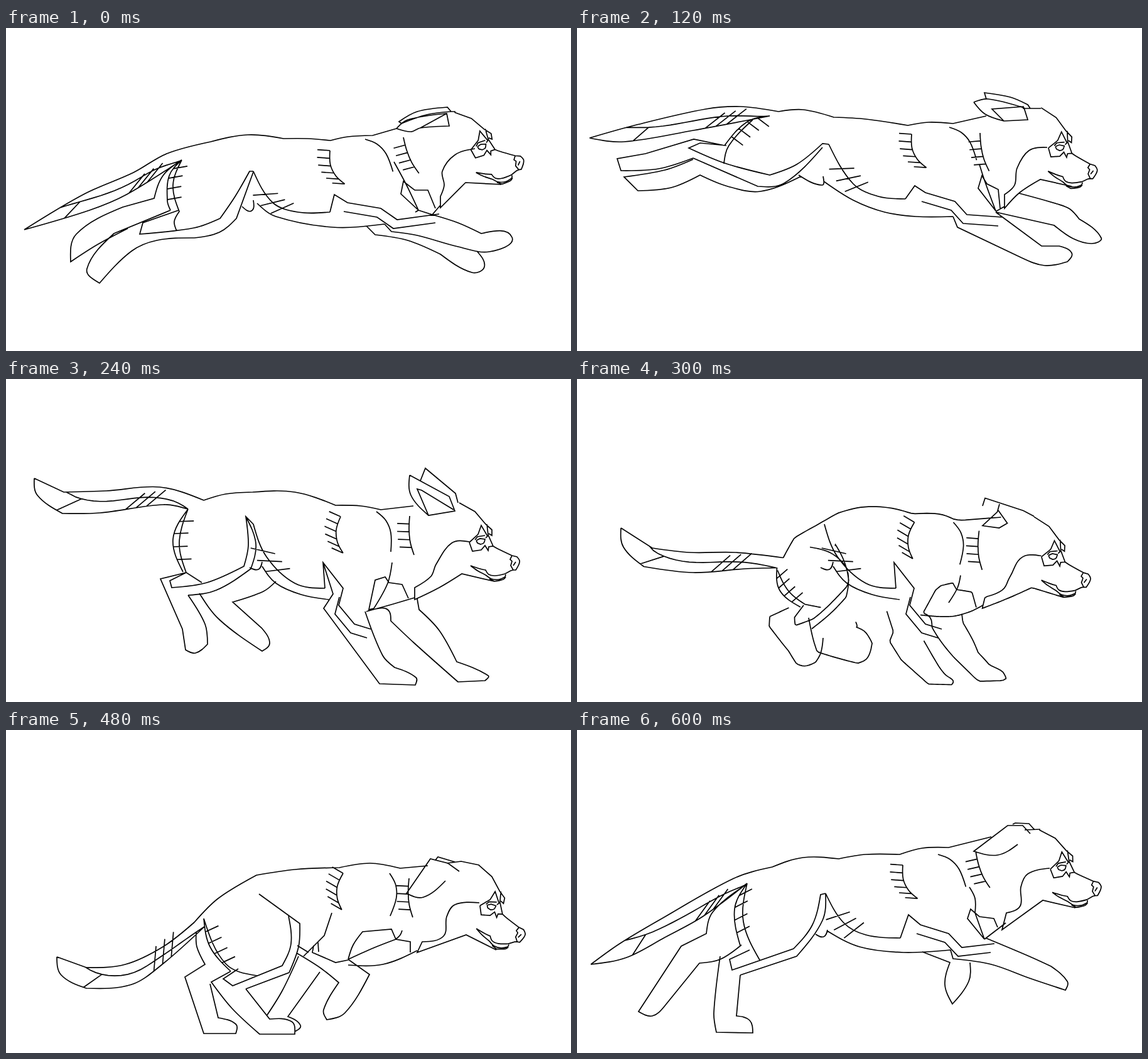
Animation, 900 px wide and 514 px high, one loop 660 ms. Source, as an HTML page:

```html
<!DOCTYPE html>
<html lang="en">
<head>
<meta charset="utf-8">
<title>Running dog</title>
<style>
html, body { margin: 0; width: 100%; height: 100%; overflow: hidden; background: #fff; }
svg { display: block; width: 100%; height: 100%; }
path { fill: none; stroke: #000; stroke-width: 1.7; }
</style>
</head>
<body>
<svg viewBox="0 0 900 514"><path id="dog"/></svg>
<script>
const STEP = 60, STEPS = 11;

// Strokes are split by "/". Points are smooth unless marked "!" as corners.
// Rigid parts are drawn around their anchor and placed as [x, y, degrees].
const RIGID = {
  head: `-33,-61! -8,-47! 9,-27! 19,-18! 19,-9! 14,-12/11,-27! 13,-10! 21,8
/-17,2! -6,-8! -3,-11! 2,-25! 12,-8! 9,-5/-17,2! -12,16! 2,14! 8,7! 13,15! 14,9! 21,8! 28,12 51,23
/-8,-2! -4,-7! 8,-9/-6,-1! 0,-4! 8,-3! 6,3 1,5! -4,3! -6,-1
/51,23! 59,25! 63,31 62,37 57,46! 53,46! 49,39! 51,32! 48,29! 51,23/57,33 53,39
/-15,39! 0,44 9,46! 14,53 24,55 40,52! 49,47! 53,46/-15,39! -4,47 9,54 18,60 30,61 40,57! 41,53
/15,60 23,64! 37,61 41,57`,
  ribs: "0,0 -7,21 -5,41 4,58",
  shoulder: "0,0 15,14 23,34 23,64",
  ruff: "0,0 -1,22 1,42 7,62"
};

// Rows of fur ticks along a stroke; anchor is where a tick sits on the stroke.
const FUR = {
  tail: { stroke: 1, count: 3, from: .64, to: .76, size: 40 },
  rump: { stroke: 0, count: 4, from: .22, to: .8, size: 23 },
  belly: { stroke: 0, count: 3, from: .27, to: .5, size: 40, anchor: .5, fan: -10 },
  ribs: { stroke: 0, count: 6, from: 0, to: 1, size: 20, angle: 204 },
  ruff: { stroke: 0, count: 4, from: .2, to: .8, size: 19, angle: 182 }
};

// Key poses by step; steps without one lie halfway between their neighbours.
const POSES = {
  0: {
    at: { head: [757, 189, -9.5], ribs: [516, 195, -20], shoulder: [572, 177, -21], ruff: [633, 174, -17] },
    fur: { tail: -51, rump: -10, belly: -14 },
    tail: "29,321! 125,264 203,230 256,200 326,181/29,321! 133,290 192,265 280,210",
    back: "326,181! 385,170 442,176! 480,176 517,179! 545,173 584,171! 622,160",
    rump: "280,210! 260,235 257,275 262,290/280,210! 266,250 276,292! 268,308 272,323",
    thigh: "275,290! 218,310! 213,328! 300,318 341,303! 365,268 388,228! 394,228/300,334! 340,325 367,303! 394,229",
    hindRear: "280,210! 250,235 236,271! 186,285! 112,328 103,372! 145,345 194,319",
    hindLead: "262,290! 172,327! 129,383 149,406! 200,355 240,338 300,334",
    groin: "376,284! 391,291 394,274",
    belly: "394,228! 425,278 465,293 516,293/400,279 430,300 520,317 603,312",
    arm: "516,293! 523,265! 544,278! 597,287! 623,305! 690,296",
    lead: "603,312! 614,324! 655,330 720,348 770,356 806,333 757,327! 720,310 679,297",
    trail: "574,315! 588,329! 640,338 692,360! 742,389 762,380 750,355",
    neck: "618,213 638,250 657,290",
    collar: "652,293! 657,290! 629,264! 633,244! 651,258! 672,258! 684,287/657,290! 679,297! 692,282",
    cheek: "747,192! 715,202 695,228 698,250 692,268! 692,286! 732,246! 789,249",
    ear: "622,160! 640,146 702,136! 706,156! 660,159 645,165 622,160/702,136 660,159",
    farEar: "630,152! 626,149! 655,133 703,126! 709,133! 716,133/709,133 670,138 630,152"
  },
  2: {
    at: { head: [768, 190, 4], ribs: [533, 169, -20], shoulder: [593, 158, -20], ruff: [642, 167, -7] },
    fur: { tail: -38, rump: 37, belly: -12 },
    tail: "20,175! 95,154 205,129 260,125 321,133/20,175! 75,181 185,163 307,140",
    back: "321,133! 360,130 409,142! 460,145 527,155! 560,150 599,152! 652,140",
    rump: "307,140! 270,150 235,187/280,146! 242,187 234,216",
    thigh: "238,187! 196,183! 178,191! 235,215 307,234! 350,217 391,184! 401,185/185,207! 288,252! 330,247 391,190",
    hindRear: "235,187! 186,177! 109,200! 64,208! 70,227! 130,224 185,207",
    hindLead: "185,209! 140,226 75,237! 97,259! 150,254 196,234! 240,252 292,260 357,236",
    groin: "353,234! 390,250 392,236",
    belly: "401,185! 440,248 480,268 523,272/393,244 440,274 490,293 540,300 599,300",
    arm: "523,272! 538,251! 555,262! 602,276! 621,297! 677,301",
    lead: "667,293! 760,314! 790,335 820,343 835,334 800,304! 785,288 765,280 704,263",
    trail: "599,300! 606,317! 709,366! 745,378 781,372! 788,358 768,347! 740,347! 667,293",
    neck: "641,217 650,245 667,291",
    collar: "667,291! 639,255! 645,235! 653,248! 671,257! 674,287/667,292! 681,284",
    cheek: "749,190! 720,195 701,223 697,250 681,265! 681,287! 705,262 738,241! 788,252",
    ear: "632,118! 655,113 712,127! 718,146! 680,148! 650,137 632,118/712,125! 661,129! 680,148",
    farEar: "652,113! 649,103! 690,110 718,122! 722,128/710,128 739,128"
  },
  3: {
    at: { head: [766, 206, 2], ribs: [547, 178, -6], shoulder: [611, 170, 2], ruff: [645, 180, 0] },
    fur: { tail: -40, rump: 12, belly: -12 },
    tail: "40,143! 92,156 160,156 260,135 318,154/40,143! 50,167 85,183! 140,188 230,165 271,160",
    back: "318,154! 360,145 405,150! 460,149 526,160! 560,156 596,161! 651,153",
    rump: "309,157! 268,190 243,248/309,157! 262,215 246,250! 258,271",
    thigh: "246,250! 215,256! 200,269! 316,273! 365,236 388,196! 402,198/220,283! 323,288 385,245 391,204",
    hindRear: "246,247! 201,252! 165,292 109,325! 110,336 135,344! 180,315 220,283",
    hindLead: "239,288! 220,340 196,373! 184,388 195,395! 240,366 268,303! 326,304! 388,265",
    groin: "370,256! 392,266 398,252",
    belly: "402,198! 435,258 470,282 525,296/398,259 440,290 500,312 578,317",
    arm: "525,296! 536,264! 552,275! 592,299! 604,324! 662,355",
    lead: "651,308! 677,315 684,324 800,385 850,382 856,370 801,361! 770,328 725,298! 710,277",
    trail: "577,311! 583,338! 665,425 735,458 748,445 706,420! 650,338! 645,310",
    neck: "640,275 646,309",
    collar: "646,309! 623,275! 628,260! 640,275! 653,275! 662,301/646,309! 673,298",
    cheek: "747,206! 715,212 699,245 690,275 674,283! 673,304! 710,277 733,258! 785,271",
    ear: "631,116! 670,125 713,136! 719,161! 669,167! 645,145 631,116/713,136! 655,137! 675,163",
    farEar: "652,120! 650,106! 714,131! 718,143/714,144 735,144"
  },
  4: {
    at: { head: [755, 258, 0], ribs: [533, 219, 0], shoulder: [590, 211, 0], ruff: [643, 218, 0] },
    fur: { tail: -40, rump: -2, belly: 3 },
    tail: "45,158! 92,180! 160,178 245,172 315,193/45,158! 50,185 90,214! 150,213 250,200 290,207",
    back: "315,193! 350,183 393,180! 460,180 525,201! 565,202 597,208! 649,202",
    rump: "290,207! 266,255 282,307/290,207! 276,260 287,308! 312,324",
    thigh: "287,308! 261,321! 264,332! 320,324 379,298! 386,265 382,219! 394,231/290,344! 335,336 390,302! 398,262 382,219",
    hindRear: "287,308! 246,318! 281,398! 286,431! 302,436 321,422! 317,390 290,344",
    hindLead: "308,341! 340,383 408,433! 420,420 407,396! 361,355! 410,338 430,322",
    groin: "388,300! 402,303 408,291",
    belly: "394,231! 415,283 460,325 508,333/408,298 430,325 470,343 514,351",
    arm: "508,333! 505,292! 537,333! 530,360! 555,390! 581,398",
    lead: "588,366! 608,367 613,385! 650,420 720,482! 763,480! 768,472 718,450! 690,400 658,367! 655,350",
    trail: "505,292! 521,342! 506,365! 595,485! 652,487! 653,475 619,459! 600,440 572,370",
    neck: "615,292 608,325 586,365",
    collar: "586,365! 578,367! 588,320! 604,315! 610,324! 631,327! 641,349/574,370! 610,360 651,348",
    cheek: "738,259! 710,261 685,295 677,314 651,332! 651,351! 690,332 726,310! 778,322",
    ear: "643,153! 645,185 673,217! 715,210! 706,187! 643,153/673,217! 655,175! 662,177! 713,208",
    farEar: "660,162! 668,142! 716,182! 720,197"
  },
  6: {
    at: { head: [759, 306, 7], ribs: [542, 237, 13], shoulder: [609, 245, 22], ruff: [638, 265, 4] },
    fur: { tail: -42, rump: -80 },
    tail: "95,316! 148,358! 200,374 260,380 342,376/95,316! 98,350 123,383! 220,403 285,404 345,394",
    back: "342,376! 340,323! 405,249! 450,227 500,220 546,228! 590,228 617,242! 702,238",
    rump: "347,393! 380,418 430,419/349,402! 405,413 465,403",
    thigh: "435,412! 430,452! 453,435! 484,354! 460,322 428,300/458,451! 503,368! 489,335 461,304! 410,299 360,316",
    hindRear: "388,420! 357,448! 417,476 494,480/425,432! 410,447! 425,449",
    hindLead: "430,419! 417,478! 500,470 550,459! 540,436 500,443 458,451",
    flank: "518,298 488,334/503,368! 497,388! 518,397/487,390 518,412/474,422 482,447",
    lead: "518,380! 520,420 533,450! 559,480! 605,480! 610,470 576,452! 572,420 571,397",
    trail: "482,447! 495,486! 554,486! 553,475 533,463",
    neck: "607,333 604,340 598,347",
    collar: "520,381! 557,340! 593,334! 599,346! 627,351! 631,378/520,381! 580,396 617,388 642,372/520,381! 557,362 599,346",
    cheek: "741,304! 708,306 694,335 680,356 649,362! 640,379! 723,354! 772,373",
    ear: "703,245! 694,238! 619,250! 630,264 665,272 699,265",
    farEar: "632,242! 632,237! 706,237! 736,240"
  },
  8: {
    at: { head: [772, 281, 12], ribs: [537, 228, 6], shoulder: [611, 228, 19], ruff: [642, 236, 1] },
    fur: { tail: -85, rump: -25 },
    tail: "81,361! 128,378! 190,373 250,345 300,306/81,361! 88,390 128,411! 200,405 250,372 316,313",
    back: "300,306! 338,268 399,231! 460,222 531,219! 580,212 628,220! 672,216",
    rump: "315,300! 325,345 358,384/315,300! 350,372 400,391",
    thigh: "370,380! 346,396! 361,407! 440,375! 454,340 450,296/382,412! 451,386! 466,345 468,308! 403,261",
    hindRear: "303,322! 304,345 317,373! 285,393! 315,483! 366,483! 366,468 338,458! 325,404",
    hindLead: "358,384! 327,401! 360,443 404,484! 460,484! 455,464 420,460! 382,412",
    flank: "519,291! 507,327! 474,360/490,343! 488,354! 525,370! 545,366/464,343 482,354/497,338 498,353",
    lead: "463,355! 500,378 530,402! 506,445 511,461! 540,450 579,389! 545,365",
    trail: "415,455! 440,415 466,360/500,385! 449,456! 469,470 460,480",
    neck: "631,319 628,326 621,333",
    collar: "545,365! 553,342 568,321! 614,317! 621,333! 644,337! 644,354/545,374! 600,373 655,351/545,365! 585,347 621,333",
    cheek: "754,275! 715,278 702,297 697,328 663,337! 655,354! 733,326! 781,350",
    ear: "722,225! 704,212! 676,205! 638,260! 665,266 700,240",
    farEar: "684,207! 688,202! 715,210/702,212! 725,209! 754,215"
  },
  10: {
    at: { head: [771, 219, -1.5], ribs: [519, 215, -20], shoulder: [575, 198, -21], ruff: [635, 193, -15] },
    fur: { tail: -54, rump: -27, belly: -28 },
    tail: "22,373! 68,340 130,303 250,236 311,218/22,373! 79,362 140,330 200,297 271,244",
    back: "311,218! 360,203 417,205! 460,198 514,198! 550,188 592,187! 660,170",
    rump: "271,244! 251,285 260,343/271,244! 265,305 291,366",
    thigh: "275,350! 243,365! 247,382! 345,348! 375,310 388,262! 396,260/260,390! 350,360! 391,303 396,260",
    hindRear: "262,251! 216,290 206,324! 166,344! 98,448! 120,455 139,440! 195,371! 228,365 262,342",
    hindLead: "228,360! 218,450 222,481! 280,482! 275,462 254,455! 260,390",
    groin: "380,325! 393,329 399,318",
    belly: "396,260! 425,307 460,326 515,331/399,320 450,345 520,354 595,350",
    arm: "515,331! 528,294! 547,310! 592,324! 613,346! 665,340",
    lead: "595,350! 599,364! 660,373 721,395 778,414! 781,400 755,376! 720,360 651,331",
    trail: "550,353! 594,370! 586,405 598,436! 624,400 626,370",
    neck: "625,250 634,268 634,291! 649,333",
    collar: "649,333! 622,300! 627,285! 641,297! 664,300! 670,314/649,333! 683,307",
    cheek: "753,220! 718,229 707,250 706,280 684,291! 677,318! 742,271! 794,283",
    ear: "722,165! 710,152! 686,152! 632,193! 670,199 702,182",
    farEar: "694,150! 698,148! 720,149! 729,159/713,159 738,158"
  }
};

const ruler = document.createElementNS("http://www.w3.org/2000/svg", "path");
const lerp = (a, b, t) => a + (b - a) * t;
const mid = (a, b) => lerp(a, b, .5);
const rad = degrees => degrees * Math.PI / 180;
const mapValues = (object, fn) =>
  Object.fromEntries(Object.entries(object).map(([key, value]) => [key, fn(value, key)]));

const parse = text => text.split("/").map(stroke =>
  stroke.trim().split(/\s+/).map((token, i, all) => {
    const [x, y] = token.replace("!", "").split(",").map(Number);
    return { x, y, sharp: token.endsWith("!") || i === 0 || i === all.length - 1 };
  }));

// Bezier handle at point i, leading dir = 1 forwards or -1 backwards.
function handle(pts, i, dir) {
  const p = pts[i], next = pts[i + dir], prev = pts[i - dir];
  const dx = next.x - prev.x, dy = next.y - prev.y;
  const k = Math.hypot(next.x - p.x, next.y - p.y) / 3 / (Math.hypot(dx, dy) || 1);
  return { x: p.x + dx * k, y: p.y + dy * k };
}

function toPath(pts) {
  let d = `M${pts[0].x},${pts[0].y}`;
  for (let i = 0; i < pts.length - 1; i++) {
    const p = pts[i], q = pts[i + 1];
    let a = p.sharp ? null : handle(pts, i, 1);
    let b = q.sharp ? null : handle(pts, i + 1, -1);
    if (!a && !b) { d += `L${q.x},${q.y}`; continue; }
    a = a || { x: mid(p.x, b.x), y: mid(p.y, b.y) };
    b = b || { x: mid(q.x, a.x), y: mid(q.y, a.y) };
    d += `C${a.x},${a.y} ${b.x},${b.y} ${q.x},${q.y}`;
  }
  return d;
}

// Evenly spaced points on a stroke, as fractions of its length.
function along(pts, count, from = 0, to = 1) {
  ruler.setAttribute("d", toPath(pts));
  const length = ruler.getTotalLength();
  return Array.from({ length: count }, (_, i) => {
    const { x, y } = ruler.getPointAtLength(length * lerp(from, to, i / (count - 1)));
    return { x, y, sharp: true };
  });
}

function ticks(strokes, { stroke, count, from, to, size, anchor = 0, fan = 0 }, angle) {
  return along(strokes[stroke], count, from, to).map((p, i) => {
    const turn = rad(angle + fan * (i - (count - 1) / 2));
    const end = k => ({ x: p.x + Math.cos(turn) * size * k, y: p.y + Math.sin(turn) * size * k, sharp: true });
    return [end(-anchor), end(1 - anchor)];
  });
}

// The middle line leaves the upper edge and ends on the lower one.
function tailDetail([top, bottom]) {
  const low = along(bottom, 21, .2);
  const line = along(top, 21, .2).map((p, i) => {
    const w = .5 + .5 * (i / 10 - 1) ** 3;
    return { x: lerp(p.x, low[i].x, w), y: lerp(p.y, low[i].y, w), sharp: true };
  });
  return [line, [low[1], line[3]]];
}

const sleeve = ([arm]) => [arm.slice(2).map(p => ({ ...p, x: p.x - 6, y: p.y + 14 }))];

const place = (strokes, [x, y, degrees]) => {
  const c = Math.cos(rad(degrees)), s = Math.sin(rad(degrees));
  return strokes.map(pts => pts.map(p => ({ ...p, x: x + p.x * c - p.y * s, y: y + p.x * s + p.y * c })));
};

function blend(a, b) {
  if (a.length !== b.length) [a, b] = [along(a, 64), along(b, 64)];
  return a.map((p, i) => ({ x: mid(p.x, b[i].x), y: mid(p.y, b[i].y), sharp: p.sharp || b[i].sharp }));
}

const between = (from, to) => ({
  at: mapValues(from.at, (spot, key) => spot.map((v, i) => mid(v, to.at[key][i]))),
  fur: mapValues(from.fur, (angle, key) => mid(angle, to.fur[key] ?? angle)),
  parts: mapValues(from.parts, (strokes, key) => to.parts[key]
    ? strokes.slice(0, to.parts[key].length).map((pts, i) => blend(pts, to.parts[key][i]))
    : strokes)
});

const rigid = mapValues(RIGID, (text, key) => {
  const strokes = parse(text);
  return FUR[key] ? [...strokes, ...ticks(strokes, FUR[key], FUR[key].angle)] : strokes;
});
const poses = mapValues(POSES, ({ at, fur, ...parts }) => ({ at, fur, parts: mapValues(parts, parse) }));

function outline({ at, fur, parts }) {
  const strokes = Object.values(parts).flat();
  for (const key in at) strokes.push(...place(rigid[key], at[key]));
  for (const key in fur) strokes.push(...ticks(parts[key], FUR[key], fur[key]));
  strokes.push(...tailDetail(parts.tail));
  if (parts.arm) strokes.push(...sleeve(parts.arm));
  return strokes.map(toPath).join("");
}

const outlines = Array.from({ length: STEPS }, (_, i) => outline(poses[i] || between(poses[i - 1], poses[i + 1])));
const dog = document.getElementById("dog");
const start = performance.now();

function tick() {
  const time = performance.now() - start;
  dog.setAttribute("d", outlines[Math.floor(time / STEP) % STEPS]);
  requestAnimationFrame(tick);
}
tick();
</script>
</body>
</html>
```
